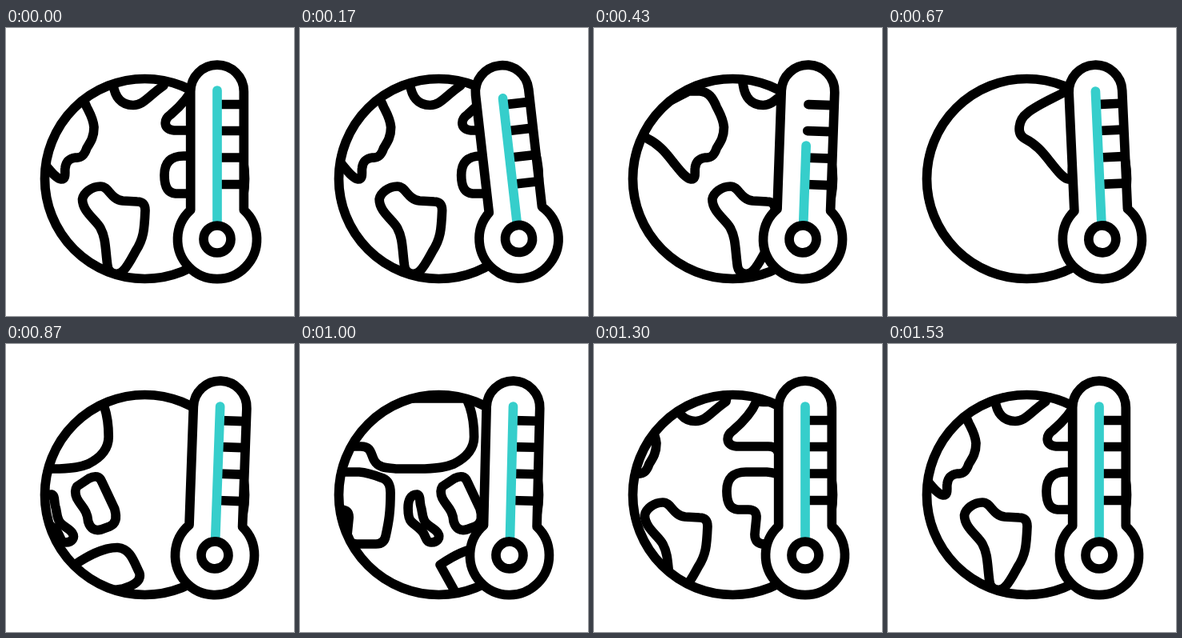
Write an HTML page that moves like this. It is 360 by 360 pixels and loops after 1670 ms.

```html
<!DOCTYPE html>
<html lang="en">
<head>
<meta charset="utf-8">
<title>Warming globe</title>
<style>
  html, body { margin: 0; width: 100%; height: 100%; overflow: hidden; background: #fff; }
  svg { display: block; width: 100vw; height: 100vh; }
  .line { fill: none; stroke: #000; stroke-width: 11.7; stroke-linecap: round; stroke-linejoin: round; }
  .solid { fill: #fff; }
  #mercury { stroke: #36cecb; }
</style>
</head>
<body>
<svg viewBox="0 0 360 360">
  <defs>
    <clipPath id="disc"><circle cx="173.5" cy="188.5" r="126"/></clipPath>
    <g id="map" class="line">
      <!-- North America -->
      <path d="M66 79C50 88 30 96 18 106C6 115 4 132 14 138C28 145 36 154 46 167C55 178 62 188 69 189C76 189 73 180 74 175C75 166 80 163 87 162C96 163 99 156 101 150C106 142 110 136 110 124C109 113 105 107 101 99C96 87 91 80 80 79Z"/>
      <!-- South America -->
      <path d="M95.5 214C97 206 107 198 118 198C129 198 130 214 146 216L164 217Q174 217 174 228C173 252 172 264 162 279C156 290 152 298 146 304C140 310 129 308 127 298C124 276 125 263 118 250C113 240 95.5 230 95.5 214Z"/>
      <!-- Greenland -->
      <path d="M132 55L134 71C136 85 143 96.5 159 96.5C172 96.5 178 85 197 72L200 55Z"/>
      <!-- Eurasia -->
      <path d="M235 72C230 84 220 96 206 108C196 115 197 127 210 128L250 128C264 128 262 138 267 146C272 155 282 155 295 156L330 156C348 155 356 154 366 150C380 143 391.5 132 391.5 116C391.5 100 390 90 386 78L382 68L300 68Q270 74 235 72Z"/>
      <!-- Africa -->
      <path d="M198 184C198 168 206 160 222 160L248 160C260 161 270 165 278 168Q287 172 287 186C287 210 285 222 281 240Q279 250 269 250L245 250Q233 250 233 238L235 218Q236 207 225 207L212 207C202 206 198 198 198 184Z"/>
      <!-- Islands and Australia -->
      <path d="M320 188C312 188 309 196 309 205C309 214 310 219 313 222C318 227 324 230 328 236C332 243 332 248 338 248C346 248 350 242 346 236C342 230 333 228 329 220C326 213 327 209 325 203C323 196 325 189 320 188Z"/>
      <path d="M352 178L367 168Q379 162 383 172L399 206Q404 223 393 228L382 232Q370 235 366 222C365 207 357 203 352 193Q348 184 352 178Z"/>
      <path d="M349 276C364 266 384 254 403 254.5C419 256 423 272 430 286C433 296 423 302 409 306L369 312Z"/>
    </g>
  </defs>

  <g clip-path="url(#disc)">
    <use id="near" href="#map"/>
    <use id="next" href="#map"/>
  </g>
  <circle class="line" cx="173.5" cy="188.5" r="125"/>

  <g id="meter">
    <path class="line solid" d="M230.7 227.5V79.4a33.3 33.3 0 0 1 66.6 0V227.5A49.5 49.5 0 1 1 230.7 227.5Z"/>
    <path class="line" d="M265 95.5H294M265 128.5H294M265 162H294M265 195.5H294"/>
    <path class="line" id="mercury"/>
    <circle class="line solid" cx="264" cy="264" r="17"/>
  </g>
</svg>
<script>
const LOOP = 1670, FPS = 30, LAP = 549;
const $ = id => document.getElementById(id);
const near = $('near'), next = $('next'), meter = $('meter'), mercury = $('mercury');

// Keys are [step, value]; each span eases in and out.
const TILT = [[2, 0], [9, -16.5], [15, 8.5], [21, -3.5], [27, 2.5], [33.5, 0]];
const DROP = [[2.6, 0], [13, 69], [20.5, 0]];

function track(keys, n) {
  if (n <= keys[0][0]) return keys[0][1];
  for (let i = 1; i < keys.length; i++) {
    const [a, from] = keys[i - 1], [b, to] = keys[i];
    if (n <= b) {
      const x = (n - a) / (b - a);
      return from + (to - from) * x * x * (3 - 2 * x);
    }
  }
  return keys[keys.length - 1][1];
}

// One lap of the globe, slow at both ends.
function spin(n) {
  const x = Math.min(1, Math.max(0, (n - 2) / 44));
  const up = x ** 1.82, down = 1.284 * (1 - x) ** 1.82;
  return LAP * up / (up + down);
}

function draw(ms) {
  const n = Math.floor((ms % LOOP) * FPS / 1000 + 0.15);
  const s = spin(n);
  near.setAttribute('transform', `translate(${s} 0)`);
  next.setAttribute('transform', `translate(${s - LAP} 0)`);
  meter.setAttribute('transform', `rotate(${track(TILT, n)} 264 180)`);
  mercury.setAttribute('d', `M264 ${78 + track(DROP, n)}V250`);
}

let start;
function tick(now) {
  start ??= now;
  draw(now - start);
  requestAnimationFrame(tick);
}
draw(0);
requestAnimationFrame(tick);
</script>
</body>
</html>
```
